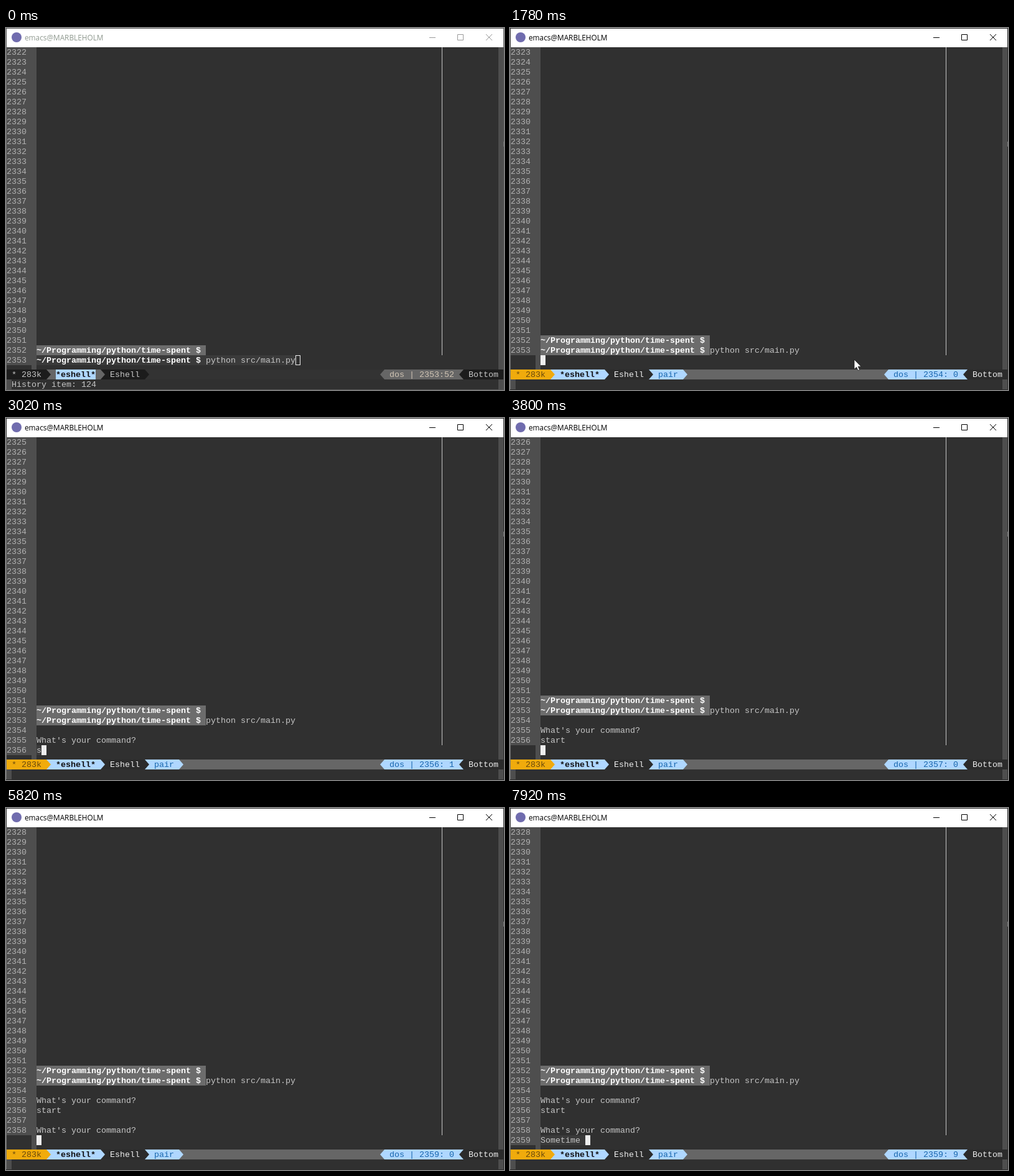
Animation of 800x583 px, one loop 8000 ms. Source, as an HTML page:

```html
<!DOCTYPE html>
<html lang="en">
<head>
<meta charset="utf-8">
<title>Eshell session</title>
<style>
  html, body { margin: 0; width: 100%; height: 100%; overflow: hidden; background: #303030; }
  svg { display: block; }
  text { font: 13.333px "Liberation Mono", "Courier New", monospace; white-space: pre; }
  .bold { font-weight: 700; }
  .title { font: 11.8px "Open Sans", "Noto Sans", sans-serif; }
</style>
</head>
<body>
<svg id="stage" width="800" height="583" viewBox="0 0 800 583"></svg>
<script>
const LOOP = 8000;
const CELL = 8, ROW = 16, TOP = 31, LEFT = 49, ROWS = 32, FIRST = 2352, ARROW = 7;
const BG = '#303030', FRINGE = '#4e4e4e', HL = '#3a3a3a', PROMPT_BG = '#6c6c6c';
const BLUE = '#afd7ff', BLUE_TEXT = '#1767ad', GREY = '#666', FG = '#c6c6c6';

const PROMPT = '~/Programming/python/time-spent $ ';
const RUN = 'python src/main.py';
const ASK = "What's your command?";
const DOC = [PROMPT, PROMPT + RUN, '', ASK, 'start', '', ASK];

// time, number of the last line, text on it
const EDITS = [
  [0, 2353, PROMPT + RUN],
  [1780, 2354, ''], [1940, 2356, ''],
  [3020, 2356, 's'], [3180, 2356, 'st'], [3320, 2356, 'sta'],
  [3400, 2356, 'star'], [3580, 2356, 'start'],
  [3800, 2357, ''], [3880, 2359, ''],
  [6300, 2359, 'S'], [6440, 2359, 'So'], [6600, 2359, 'Some'],
  [6760, 2359, 'Somet'], [7620, 2359, 'Someti'], [7780, 2359, 'Sometim'],
  [7840, 2359, 'Sometime'], [7920, 2359, 'Sometime ']
];
const BLINKS = [[2320, 2780], [4340, 4800], [5360, 5820], [7300, 7620]];
const POINTER_IN = 1000, PRESS = 1080, FOCUS = 1160, REGION = 1240, RELEASE = 1400, SETTLE = 1460;

const between = (t, a, b) => t >= a && t < b;
const rect = (x, y, w, h, fill) => `<rect x="${x}" y="${y}" width="${w}" height="${h}" fill="${fill}"/>`;
const text = (x, y, s, fill, cls = '') => `<text x="${x}" y="${y}" fill="${fill}" class="${cls}">${s}</text>`;
const poly = (points, fill, extra = '') => `<polygon points="${points}" fill="${fill}" ${extra}/>`;
const label = (x, s, fill, cls) => text(x, 562, s, fill, cls);
const arrowRight = (x, end, fill) => poly(`${x},550 ${end},550 ${end + ARROW},558 ${end},566 ${x},566`, fill);
const arrowLeft = (x, end, fill) => poly(`${x - ARROW},558 ${x},550 ${end},550 ${end},566 ${x},566`, fill);

function titleBar(active) {
  const ink = active ? '#000' : '#999';
  return rect(1, 1, 798, 30, '#fff') +
    '<circle cx="17" cy="15" r="8" fill="#706cae"/>' +
    text(30, 20, 'emacs@MARBLEHOLM', active ? '#000' : '#8f998f', 'title') +
    `<path d="M680 15.5h10M725.5 10.5h9v9h-9z" fill="none" stroke="${ink}"/>` +
    `<path d="M771 10l10 10m0-10l-10 10" stroke="${ink}"/>`;
}

function promptLine(y, s, bg) {
  const width = PROMPT.length * CELL;
  return rect(LEFT, y, width, ROW, bg) +
    text(LEFT, y + 12, PROMPT, '#fff', 'bold') +
    text(LEFT + width, y + 12, s.slice(PROMPT.length), FG);
}

function buffer({ last, typed, active, cursorOn }) {
  const first = last - ROWS + 1;
  let out = rect(1, TOP, 798, 519, BG) + rect(41, TOP, 8, 519, FRINGE) +
    rect(791, TOP, 8, 519, FRINGE) + rect(700, TOP, 1, 496, FG);
  for (let i = 0; i < ROWS; i++) {
    const n = first + i, y = TOP + i * ROW, current = n === last;
    const line = current ? typed : DOC[n - FIRST] || '';
    if (!current || typed) {
      out += rect(1, y, 40, ROW, FRINGE) + text(1, y + 12, n, '#b2b2b2');
    }
    if (current) out += rect(LEFT, y, typed.length * CELL, ROW, HL);
    if (line.startsWith(PROMPT)) out += promptLine(y, line, current ? HL : PROMPT_BG);
    else if (line) out += text(LEFT, y + 12, line, FG);
  }
  const x = LEFT + typed.length * CELL;
  if (!active) out += `<rect x="${x + .5}" y="527.5" width="7" height="15" fill="none" stroke="#eee"/>`;
  else if (cursorOn) out += rect(x, 527, CELL, ROW, '#eee');
  return out;
}

function modeLine({ last, typed, active, region }) {
  const dark = active ? '#2b2b2b' : '#1c1c1c';
  const light = active ? '#eee' : FG;
  const info = active ? BLUE : GREY;
  const column = String(typed.length).padStart(2);
  let out = rect(1, 550, 798, ROW, active ? GREY : '#333');
  if (active) out += arrowRight(223, 278, BLUE) + label(238, 'pair', BLUE_TEXT);
  out += arrowRight(152, 223, dark) + label(167, 'Eshell', light) + arrowRight(65, 152, info);
  if (!active) out += rect(80, 550, 64, ROW, BLUE);
  out += label(80, '*eshell*', '#111', 'bold') +
    arrowRight(1, 65, active ? '#f0ab0c' : dark) + label(9, '* 283k', active ? '#6a4a0c' : light);
  if (region) out += arrowLeft(529, 608, dark) + label(537, '0 chars', light);
  return out + arrowLeft(608, 735, info) +
    label(616, `dos | ${last}:${column}`, active ? BLUE_TEXT : '#d0c4b4') +
    arrowLeft(735, 799, dark) + label(743, 'Bottom', light);
}

function echoArea(active) {
  return rect(1, 566, 798, 16, BG) + rect(1, 566, 8, 16, FRINGE) + rect(791, 566, 8, 16, FRINGE) +
    (active ? '' : text(9, 578, 'History item: 124', FG));
}

function pointer({ shown, pressed, settled }) {
  if (!shown) return '';
  const shift = settled ? 'translate(553 534)' : 'translate(552 533)';
  const arrow = poly('0,0 0,15.5 3.6,12.2 6.2,17.6 8.6,16.5 6.2,11.2 11,11.2', '#fff',
    `stroke="#111" stroke-width=".7" transform="${shift}"`);
  return arrow + (pressed ? '<circle cx="551" cy="533" r="12" fill="#ff0" fill-opacity=".48"/>' : '');
}

function stateAt(t) {
  const [, last, typed] = EDITS.findLast(e => e[0] <= t);
  return {
    last, typed,
    active: t >= FOCUS,
    cursorOn: !BLINKS.some(([off, on]) => between(t, off, on)),
    region: between(t, REGION, SETTLE),
    shown: t >= POINTER_IN && last < 2356,
    pressed: between(t, PRESS, RELEASE),
    settled: t >= SETTLE
  };
}

const stage = document.getElementById('stage');
let shownKey = '';

function draw(t) {
  const s = stateAt(t), key = JSON.stringify(s);
  if (key === shownKey) return;
  shownKey = key;
  stage.innerHTML = rect(0, 0, 800, 583, s.active ? '#2b2b2b' : '#555') + rect(0, TOP, 1, 551, '#777') +
    titleBar(s.active) + buffer(s) + modeLine(s) + echoArea(s.active) +
    rect(799, 183, 1, 8, '#777') + pointer(s);
}

const start = performance.now();
function tick() {
  draw((performance.now() - start) % LOOP);
  requestAnimationFrame(tick);
}
tick();
</script>
</body>
</html>
```
